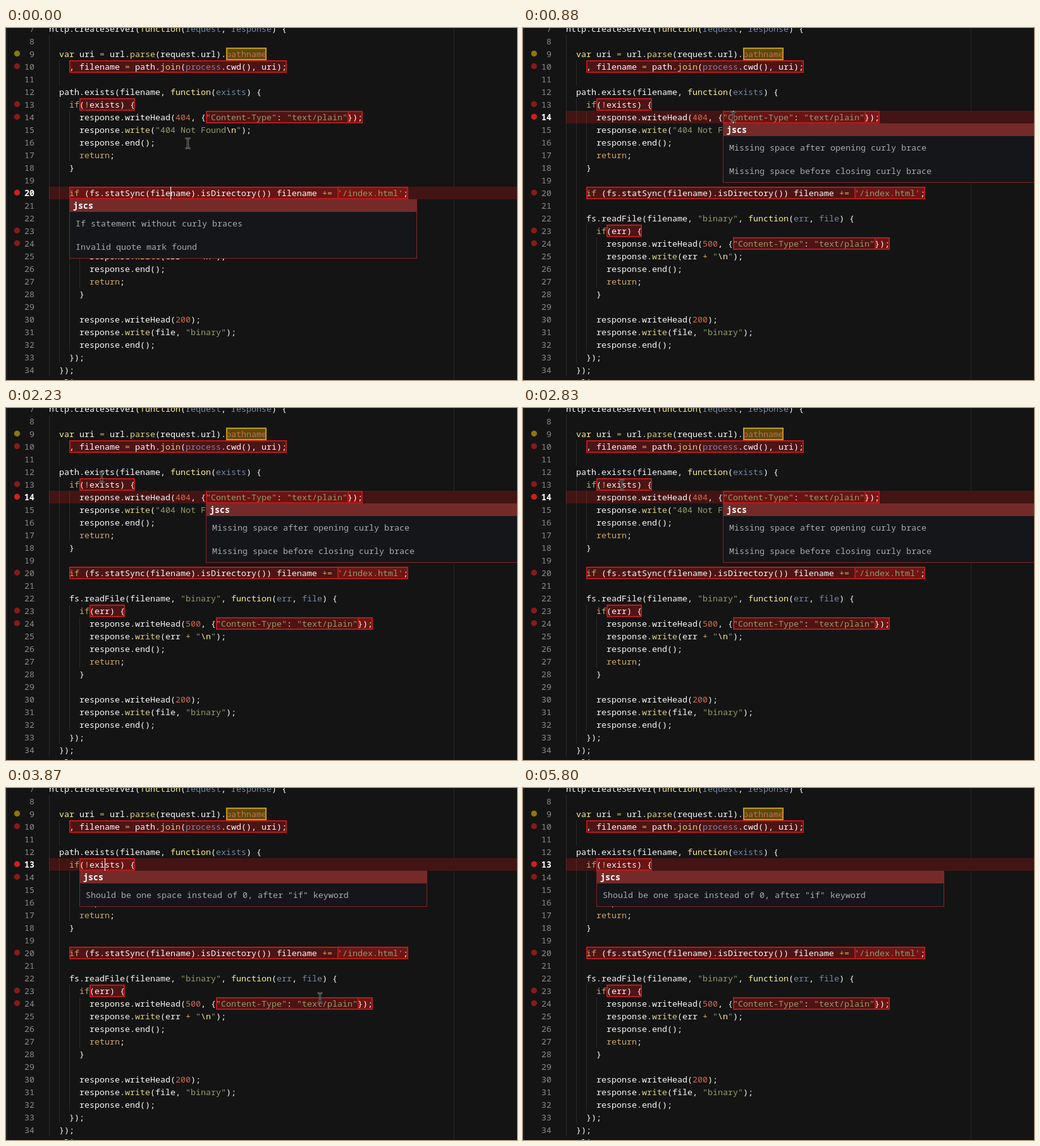
Animation of 808 by 557 pixels, one loop 6260 ms. Source, as an HTML page with a canvas:

```html
<!DOCTYPE html>
<html lang="en">
<head>
<meta charset="utf-8">
<title>Linter messages in an editor</title>
<style>
html, body { margin: 0; width: 100%; height: 100%; overflow: hidden; background: #141414; }
canvas { display: block; }
</style>
</head>
<body>
<canvas id="stage" width="808" height="557"></canvas>
<script>
const g = document.getElementById('stage').getContext('2d');
const LOOP = 6260, TICK = 149, BLINK = 400 / TICK;
const CELL = 8, ROW = 20, LEFT = 68, FIRST = 7;
const FAMILY = '13.333px "Noto Sans Mono", "DejaVu Sans Mono", monospace';

const code = String.raw`http.createServer(function(request, response) {

  var uri = url.parse(request.url).pathname
    , filename = path.join(process.cwd(), uri);

  path.exists(filename, function(exists) {
    if(!exists) {
      response.writeHead(404, {"Content-Type": "text/plain"});
      response.write("404 Not Found\n");
      response.end();
      return;
    }

    if (fs.statSync(filename).isDirectory()) filename += '/index.html';

    fs.readFile(filename, "binary", function(err, file) {
      if(err) {
        response.writeHead(500, {"Content-Type": "text/plain"});
        response.write(err + "\n");
        response.end();
        return;
      }

      response.writeHead(200);
      response.write(file, "binary");
      response.end();
    });
  });
}).listen(parseInt(port, 10));`.split('\n');

const syntax = /(?<escape>\\n)|(?<string>(?<=\\n)"|"[^"\\]*"?|'[^']*')|(?<storage>\b(?:var|function)\b)|(?<keyword>\b(?:if|return)\b|[=!+]+)|(?<variable>(?<=function\([^)]*)\w+|\bprocess\b)|(?<constant>\b\d+\b|\bpathname\b)|(?<support>\b(?:parse|join|write)\b)/g;
const colors = {
  escape: '#f9ee98', string: '#8f9d6a', storage: '#f9ee98', keyword: '#cda869',
  variable: '#7587a6', constant: '#cf6a4c', support: '#dad085', plain: '#f8f8f8'
};

// every mark runs from the given text to the end of its line
const warning = [9, 'pathname'];
const errors = [
  [10, ','], [13, '('], [14, '"'], [14, '}'], [20, 'if'], [20, "'"], [23, '('], [24, '"'], [24, '}']
];
const errorLines = new Set(errors.map(e => e[0]));

// each click (in ticks) selects a line, opens its messages and restarts the caret
const scenes = [
  { start: -.7, line: 20, caret: 24,
    notes: ['If statement without curly braces', 'Invalid quote mark found'] },
  { start: 5.3, line: 14, caret: 33,
    notes: ['Missing space after opening curly brace', 'Missing space before closing curly brace'] },
  { start: 20, line: 13, caret: 11,
    notes: ['Should be one space instead of 0, after "if" keyword'] }
];

// pointer path: tick, x, y
const path = [
  [0, 287, 182], [5, 332, 140], [11, 332, 140], [14, 114, 112], [15, 151, 109],
  [19, 156, 121], [23, 156, 121], [26, 496, 332], [30, 637, 441]
];

const rowTop = line => line * ROW - 149;
const colX = col => LEFT + col * CELL;
const markX = ([line, text]) => colX(code[line - FIRST].indexOf(text));
const indent = i => code[i] ? code[i].search(/\S/) : Math.max(indent(i - 1), indent(i + 1));

function rect(x, y, w, h, color) {
  g.fillStyle = color;
  g.fillRect(x, y, w, h);
}

function write(text, x, mid, color, weight = 500) {
  g.font = weight + ' ' + FAMILY;
  g.fillStyle = color;
  g.fillText(text, x, mid + 5);
}

function drawMark(mark, fill, border) {
  const x = markX(mark), y = rowTop(mark[0]);
  const w = colX(code[mark[0] - FIRST].length) - x;
  rect(x, y, w, ROW, fill);
  g.strokeStyle = border;
  g.lineWidth = 2;
  g.strokeRect(x + 1, y + 1, w - 2, ROW - 2);
}

function drawCode(text, mid) {
  let col = 0;
  const put = (part, kind) => {
    write(part, colX(col), mid, colors[kind]);
    col += part.length;
  };
  for (const m of text.matchAll(syntax)) {
    put(text.slice(col, m.index), 'plain');
    put(m[0], Object.keys(m.groups).find(k => m.groups[k] !== undefined));
  }
  put(text.slice(col), 'plain');
}

function drawGutter(line, mid, active) {
  const label = String(line), warn = line === warning[0];
  write(label, 45 - label.length * CELL, mid, active ? '#ffffff' : '#8c8c8c', active ? 700 : 500);
  if (!warn && !errorLines.has(line)) return;
  g.fillStyle = warn ? '#8f760c' : active ? '#cc2020' : '#861b1b';
  g.beginPath();
  g.arc(17.5, mid - .5, 4.7, 0, 7);
  g.fill();
}

function drawPopup({ line, notes }) {
  const x = markX(errors.find(e => e[0] === line));
  const y = rowTop(line + 1), h = notes.length * 37;
  rect(x, y, 550, ROW + h, '#842424');
  rect(x + 1, y, 548, ROW, '#752a2a');
  rect(x + 1, y + ROW, 548, h - 1, '#14161a');
  write('jscs', x + 6, y + 10, '#ffffff', 700);
  notes.forEach((note, i) => write(note, x + 10, y + 38 + i * 37, '#a9abad', 400));
}

function drawPointer(tick) {
  const next = path.findIndex(p => p[0] > tick);
  const [t0, x0, y0] = path.at(next < 0 ? -1 : next - 1);
  const [t1, x1, y1] = path.at(next);
  const p = (tick - t0) / (t1 - t0 || 1);
  const x = Math.round(x0 + (x1 - x0) * p) + .5, y = Math.round(y0 + (y1 - y0) * p) + .5;
  g.beginPath();
  for (const s of [-1, 1]) {
    g.moveTo(x - 4, y + s * 8);
    g.quadraticCurveTo(x, y + s * 8, x, y + s * 5);
    g.quadraticCurveTo(x, y + s * 8, x + 4, y + s * 8);
  }
  g.moveTo(x, y - 6);
  g.lineTo(x, y + 6);
  g.moveTo(x - 2, y + 4);
  g.lineTo(x + 2, y + 4);
  for (const [width, color] of [[2.6, '#8c8c8c'], [1, '#101010']]) {
    g.lineWidth = width;
    g.strokeStyle = color;
    g.stroke();
  }
}

function draw(time) {
  const tick = Math.floor((time + 15) / TICK);
  const scene = scenes.filter(s => s.start <= tick).pop();
  rect(0, 0, 808, 557, '#141414');
  rect(0, 0, 3, 557, '#1c1c1c');
  rect(3, 0, 1, 557, '#0c0c0c');
  rect(708, 0, 1, 557, '#262626');
  rect(LEFT, rowTop(scene.line), 740, ROW, '#431414');

  code.forEach((_, i) => {
    for (let col = 0; col < indent(i); col += 2)
      rect(colX(col), rowTop(i + FIRST), 1, ROW, 'rgba(255,255,255,.1)');
  });
  drawMark(warning, '#594a0d', '#c29c10');
  for (const e of errors) drawMark(e, 'rgba(150,20,20,.45)', '#b51b1b');
  code.forEach((text, i) => {
    const line = i + FIRST, mid = rowTop(line) + 10;
    drawGutter(line, mid, line === scene.line);
    drawCode(text, mid);
  });

  if (Math.floor((tick - scene.start) / BLINK) % 2 === 0)
    rect(colX(scene.caret), rowTop(scene.line), 1, ROW, '#ffffff');
  drawPopup(scene);
  if (tick <= path.at(-1)[0]) drawPointer(tick);
}

function loop() {
  draw(performance.now() % LOOP);
  requestAnimationFrame(loop);
}
loop();
</script>
</body>
</html>
```
